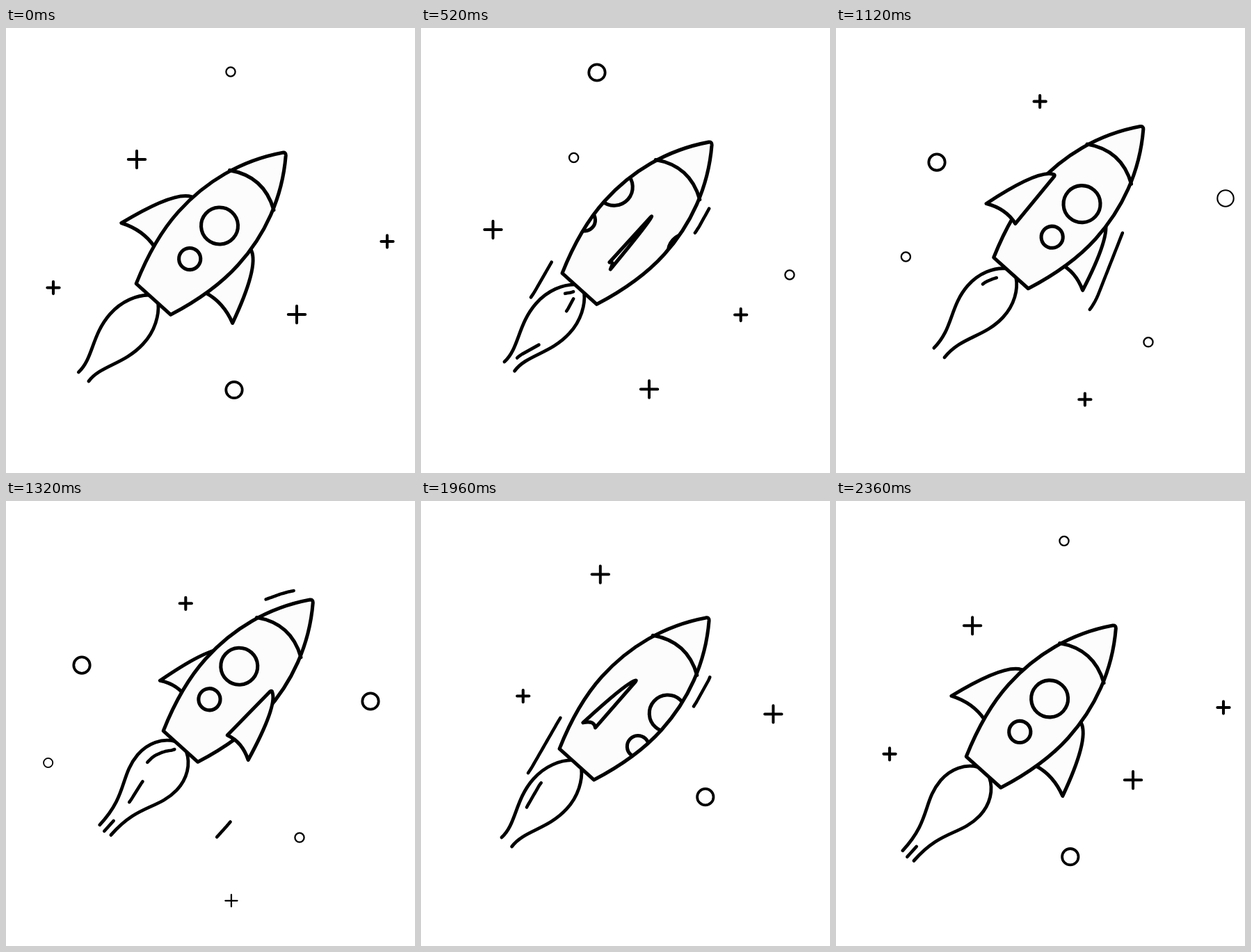
Write an HTML page with a canvas that moves like this. It is 588 px wide and 640 px high and loops after 2.4 s.

```html
<!DOCTYPE html>
<html lang="en">
<head>
<meta charset="utf-8">
<title>Rocket</title>
<style>
html, body { margin: 0; width: 100%; height: 100%; overflow: hidden; background: #fff; }
canvas { display: block; }
</style>
</head>
<body>
<canvas id="stage" width="588" height="640"></canvas>
<script>
const ctx = document.getElementById('stage').getContext('2d');
const STEP = 40, STEPS = 60;
const INK = '#000', SKIN = '#fcfcfc';
const LINE = 5.1;

// kind, x, y at step `at`, speed per step, first and last step
const SLOPE = 1.195;
const stars = [
  ['plus', 188, 189, 0, 6.5, -9, 24],
  ['plus', 418, 412, 0, 6.92, -9, 18],
  ['smallPlus', 548, 307, 0, 6.79, -9, 33],
  ['smallPlus', 68, 373.5, 0, 7, -9, 4],
  ['dot', 323, 63, 0, 7.95, -9, 34],
  ['ring', 328, 520.5, 0, 7.2, -9, 5],
  ['ring', 253, 64, 13, 7.2, 10, 40],
  ['dot', 530, 355, 13, 5.4, 6, 45],
  ['smallPlus', 328, 64, 23, 6.97, 20, 69],
  ['ring', 524, 288, 33, 7.2, 28, 69],
  ['plus', 301, 54, 42, 6.17, 40, 69],
  ['plus', 562, 240, 42, 7.94, 42, 69],
  ['dot', 328, 57.5, 59, 7.9, 56, 69],
  ['smallPlus', 557, 297, 59, 6.8, 57, 69]
];
const shapes = {
  plus: { arm: 12.2, width: 4 },
  smallPlus: { arm: 8.6, width: 4.1 },
  ring: { radius: 11.7, width: 3.8 },
  dot: { radius: 6.6, width: 2.3 }
};

// Streak routes: [distance from the axis, height along it], top to bottom
const air = [[1, 322], [0, 314], [4, 304], [16, 291], [35, 268], [58, 225],
  [70, 173], [72, 104], [63, 37], [43, -56]];
const airWide = air.slice(0, 6).concat([[72, 173], [118, 50], [126, -32], [126, -62]]);
const wide = [[2.5, -9], [12, -20], [19.5, -36], [20.5, -55], [12, -95], [0, -130], [0, -184]];
const thin = [[2, -9], [3, -16], [8, -36], [7, -74], [1, -108], [0, -184]];

// route, side, step when the head starts, step when the tail starts
const streaks = [
  [air, -1, 2, 4.1], [air, -1, 13, 15.1], [air, -1, 30.7, 31.7], [air, -1, 37.6, 41],
  [air, 1, 8.8, 9.9], [airWide, 1, 20.2, 23.3], [air, 1, 34, 35.85], [air, 1, 44.9, 46.2],
  [wide, 1, 8, 9.4], [wide, -1, 12.6, 13], [thin, 1, 11.9, 12.7],
  [thin, 1, 19, 20.4], [wide, 1, 16.7, 18.1],
  [wide, -1, 31.4, 33], [thin, -1, 29, 30.4], [wide, -1, 26.8, 27.6],
  [wide, 1, 38.6, 41.9], [wide, 1, 35, 36.4], [wide, -1, 45.6, 47.2], [wide, 1, 52.8, 53.6]
];

// Half of the flame outline, short and long: start, then two cubic curves
const flameShort = [9, 0, 21, -11, 32.5, -32, 32, -58, 31.5, -98, 7, -122, 9.8, -150];
const flameLong = [11, 0, 28, -9, 38.5, -28, 38, -50, 36.5, -90, 10, -102, 10.9, -162];

const clamp = v => Math.max(0, Math.min(1, v));
const wave = u => (1 - Math.cos(Math.PI * u)) / 2;

function stroke(width) {
  ctx.lineWidth = width;
  ctx.stroke();
}

function circle(x, y, r) {
  ctx.beginPath();
  ctx.arc(x, y, r, 0, 2 * Math.PI);
}

function drawStars(n) {
  for (const [kind, x0, y0, at, speed, from, to] of stars) {
    if (n < from || n > to) continue;
    const { arm, radius, width } = shapes[kind];
    const x = x0 - speed * (n - at);
    const y = y0 + speed * SLOPE * (n - at);
    const weight = Math.min(1, 0.55 + 0.25 * Math.min(n - from, to - n));
    if (radius) {
      circle(x, y, radius);
    } else {
      ctx.beginPath();
      ctx.moveTo(x - arm, y);
      ctx.lineTo(x + arm, y);
      ctx.moveTo(x, y - arm);
      ctx.lineTo(x, y + arm);
    }
    stroke(width * weight);
  }
}

function offsetAt(route, y) {
  if (y >= route[0][1]) return route[0][0];
  for (let i = 1; i < route.length; i++) {
    const [x0, y0] = route[i - 1], [x1, y1] = route[i];
    if (y >= y1) return x0 + (x1 - x0) * (y0 - y) / (y0 - y1);
  }
  return route[route.length - 1][0];
}

function drawStreaks(n) {
  for (const [route, side, head, tail] of streaks) {
    const top = route[0][1], drop = top - route[route.length - 1][1];
    const span = top > 0 ? 10.5 : 7;
    const a = clamp((n - tail) / span), b = clamp((n - head) / span);
    if (b - a < 0.04) continue;
    const soft = drop / 45;
    ctx.beginPath();
    for (let i = 0; i <= 24; i++) {
      const y = top - drop * (a + (b - a) * i / 24);
      const x = (offsetAt(route, y - soft) + offsetAt(route, y) + offsetAt(route, y + soft)) / 3;
      ctx.lineTo(side * x, -y);
    }
    stroke(4.6);
  }
}

function drawFlame(n) {
  const grow = wave((n % 12) / 10);
  const p = flameShort.map((v, i) => v + (flameLong[i] - v) * grow);
  for (const s of [-1, 1]) {
    ctx.beginPath();
    ctx.moveTo(s * p[0], -p[1]);
    for (let i = 2; i < 14; i += 6) {
      ctx.bezierCurveTo(s * p[i], -p[i + 1], s * p[i + 2], -p[i + 3], s * p[i + 4], -p[i + 5]);
    }
    stroke(4.8);
  }
}

function drawFin(k) {
  ctx.beginPath();
  ctx.moveTo(49.5 * k, -57);
  ctx.lineTo(54 * k, -145);
  ctx.quadraticCurveTo(55 * k, -148, 58 * k, -146);
  ctx.bezierCurveTo(74 * k, -139, 91 * k, -105, 107.5 * k, -50.5);
  ctx.quadraticCurveTo(78 * k, -64, 49.5 * k, -57);
  ctx.closePath();
  ctx.fill();
  stroke(LINE);
}

function hull() {
  ctx.beginPath();
  ctx.moveTo(-33.4, 0);
  ctx.bezierCurveTo(-46, -34, -57.5, -75, -57.5, -118);
  ctx.bezierCurveTo(-57.5, -175, -40.5, -232, -3, -281);
  ctx.quadraticCurveTo(0, -284.5, 3, -281);
  ctx.bezierCurveTo(40.5, -232, 57.5, -175, 57.5, -118);
  ctx.bezierCurveTo(57.5, -75, 46, -34, 33.4, 0);
  ctx.closePath();
}

function drawBody(turn) {
  hull();
  ctx.fill();
  ctx.save();
  ctx.clip();
  for (const x of [-140 * turn, 140 * (1 - turn)]) {
    circle(x, -142, 26.5);
    stroke(LINE);
    circle(x, -78, 15.6);
    stroke(LINE);
  }
  ctx.restore();
  ctx.beginPath();
  ctx.moveTo(-42.7, -211);
  ctx.quadraticCurveTo(0, -238, 42.7, -211);
  stroke(LINE);
  hull();
  stroke(LINE);
}

function draw(n) {
  ctx.fillStyle = '#fff';
  ctx.fillRect(0, 0, 588, 640);
  ctx.strokeStyle = INK;
  ctx.fillStyle = SKIN;
  ctx.lineCap = ctx.lineJoin = 'round';
  drawStars(n);

  const lift = wave(n / 30);
  const turn = (n < 30 ? n / 30 : (n - 30) / 29) % 1;
  const k = 1 - 2 * turn;
  ctx.save();
  ctx.translate(212 + 40 * lift, 390 - 38 * lift);
  ctx.rotate(42 * Math.PI / 180);
  drawFlame(n);
  drawFin(-k);
  if (turn === 0) drawFin(k);
  drawBody(turn);
  if (turn > 0) drawFin(k);
  drawStreaks(n);
  ctx.restore();
}

const start = performance.now();
function tick() {
  draw(Math.floor((performance.now() - start) / STEP) % STEPS);
  requestAnimationFrame(tick);
}
tick();
</script>
</body>
</html>
```
